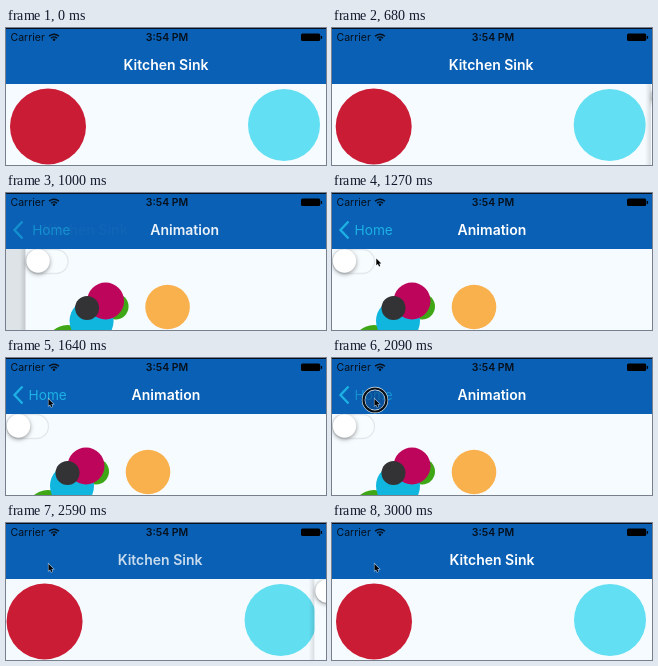
An HTML page with a canvas that plays this animation: 320 px wide and 137 px high, repeating every 3.05 s.

```html
<!DOCTYPE html>
<html lang="en">
<head>
<meta charset="utf-8">
<title>Navigation demo</title>
<style>
html, body { margin: 0; width: 100%; height: 100%; overflow: hidden; background: #f5fbff; }
canvas { display: block; width: 320px; height: 137px; }
</style>
</head>
<body>
<canvas id="stage"></canvas>
<script>
const W = 320, H = 137, BAR = 56, LOOP = 3050;
const PUSH = 675, POP = 2218;
const BLUE = '#0a60b4', PAPER = '#f5fbff', LINK = '#1cb0e4', INK = '#06101c';
const FONT = 'Inter, "Liberation Sans", sans-serif';

const canvas = document.getElementById('stage');
const ctx = canvas.getContext('2d');
const scale = window.devicePixelRatio || 1;
canvas.width = W * scale;
canvas.height = H * scale;

const clamp = v => Math.max(0, Math.min(1, v));
const easeOut = v => 1 - (1 - clamp(v)) ** 2;

// Critically damped spring, settles in about half a second
function spring(ms) {
  if (ms <= 0) return 0;
  if (ms > 550) return 1;
  const k = ms * 0.0138;
  return 1 - Math.exp(-k) * (1 + k);
}

function disc(x, y, r, color) {
  ctx.fillStyle = color;
  ctx.beginPath();
  ctx.arc(x, y, r, 0, Math.PI * 2);
  ctx.fill();
}

function pill(x, y, w, h, r) {
  ctx.beginPath();
  ctx.roundRect(x, y, w, h, r);
}

function text(str, x, y, size, weight, color, align = 'left', alpha = 1) {
  if (alpha < 0.01) return;
  ctx.globalAlpha = alpha;
  ctx.font = `${weight} ${size}px ${FONT}`;
  ctx.textAlign = align;
  ctx.fillStyle = color;
  ctx.fillText(str, x, y);
  ctx.globalAlpha = 1;
}

function homePage(x, dim) {
  ctx.fillStyle = PAPER;
  ctx.fillRect(0, BAR, W, H - BAR);
  disc(x + 42, 98.5, 38, '#cb1c35');
  disc(x + 278, 97, 36, '#62dff2');
  ctx.fillStyle = `rgba(0,0,0,${0.1 * dim})`;
  ctx.fillRect(0, BAR, W, H - BAR);
}

function toggle(x) {
  pill(x + 0.5, 56.5, 42, 24, 12);
  ctx.fillStyle = '#f7fcff';
  ctx.fill();
  ctx.strokeStyle = '#e2e8ec';
  ctx.lineWidth = 1.3;
  ctx.stroke();
  ctx.save();
  ctx.shadowColor = 'rgba(0,0,0,.4)';
  ctx.shadowBlur = 4 * scale;
  ctx.shadowOffsetY = 1.5 * scale;
  disc(x + 12.5, 68, 11.7, '#fff');
  ctx.restore();
}

function demoPage(x) {
  if (x >= W) return;
  if (x > 0) {
    const g = ctx.createLinearGradient(x - 6, 0, x, 0);
    g.addColorStop(0, 'rgba(0,0,0,0)');
    g.addColorStop(1, 'rgba(0,0,0,.12)');
    ctx.fillStyle = g;
    ctx.fillRect(x - 6, BAR, 6, H - BAR);
  }
  ctx.fillStyle = PAPER;
  ctx.fillRect(x, BAR, W, H - BAR);
  toggle(x);
  disc(x + 42, 154, 22, '#3fa716');
  disc(x + 90, 113.5, 13, '#3fa716');
  disc(x + 66, 128, 22, '#10b6de');
  disc(x + 80, 108, 18.5, '#be055c');
  disc(x + 61.5, 115, 12, '#333335');
  disc(x + 142, 114, 22.3, '#f9b14d');
}

function statusBar() {
  text('Carrier', 4.5, 13, 10.5, 400, INK);
  text('3:54 PM', 161, 13, 10.5, 600, INK, 'center');
  ctx.strokeStyle = INK;
  ctx.lineWidth = 1.5;
  for (const r of [4, 6.8]) {
    ctx.beginPath();
    ctx.arc(48, 13, r, -Math.PI * 0.76, -Math.PI * 0.24);
    ctx.stroke();
  }
  disc(48, 11.8, 1.3, INK);
  ctx.fillStyle = '#000';
  pill(295, 5.5, 19.2, 7.6, 1.5);
  ctx.fill();
  ctx.fillRect(314.8, 8, 1.3, 2.8);
}

function backButton(p, pressed) {
  const alpha = p ** 8;
  if (alpha < 0.01) return;
  ctx.globalAlpha = alpha;
  ctx.strokeStyle = LINK;
  ctx.lineWidth = 2.4;
  ctx.beginPath();
  ctx.moveTo(16.5, 28.5);
  ctx.lineTo(8.5, 37);
  ctx.lineTo(16.5, 45.5);
  ctx.stroke();
  text('Home', 22.5 + 60 * (1 - p), 42, 13.7, 400, LINK, 'left', alpha * (pressed ? 0.6 : 1));
}

function navBar(p, popping, pressed) {
  ctx.fillStyle = BLUE;
  ctx.fillRect(0, 0, W, BAR);
  ctx.fillStyle = INK;
  ctx.fillRect(0, 0, W, 1);
  statusBar();
  const q = 1 - p;
  text('Kitchen Sink', 160 - 85 * p ** 0.8, 42, 14, 600, '#fff', 'center', q ** (popping ? 7 : 1.25));
  text('Animation', 160 + 174 * q ** 0.8, 42, 14, 600, '#fff', 'center', p ** 1.4);
  backButton(p, pressed);
}

function pointer(t, pressed) {
  if (t < 1150) return;
  const rise = easeOut((t - 1150) / 120);
  const settle = easeOut((t - 1290) / 220);
  if (pressed) {
    disc(43, 42, 12, 'rgba(8,60,120,.45)');
    ctx.beginPath();
    ctx.arc(43, 42, 11.5, 0, Math.PI * 2);
    ctx.strokeStyle = '#e8eef4';
    ctx.lineWidth = 3.4;
    ctx.stroke();
    ctx.strokeStyle = '#071018';
    ctx.lineWidth = 2.2;
    ctx.stroke();
  }
  ctx.save();
  ctx.translate(44.3 - 1.8 * settle, 140 - 74.5 * rise - 24.5 * settle);
  ctx.scale(0.9, 0.9);
  ctx.beginPath();
  for (const [x, y] of [[0, 0], [0, 7.5], [1.8, 6], [3, 9], [4.4, 8.4], [3.2, 5.6], [5.5, 5.5]]) ctx.lineTo(x, y);
  ctx.closePath();
  ctx.strokeStyle = 'rgba(255,255,255,.6)';
  ctx.lineWidth = 1.3;
  ctx.stroke();
  ctx.fillStyle = '#000';
  ctx.fill();
  ctx.restore();
}

function draw() {
  const t = performance.now() % LOOP;
  const popping = t >= POP;
  const p = popping ? 1 - spring(t - POP) : spring(t - PUSH);
  const pressed = t >= 2030 && t < 2180;
  ctx.setTransform(scale, 0, 0, scale, 0, 0);
  homePage(-96 * p, p);
  demoPage(W * (1 - p));
  navBar(p, popping, pressed);
  pointer(t, pressed);
  requestAnimationFrame(draw);
}
draw();
</script>
</body>
</html>
```
